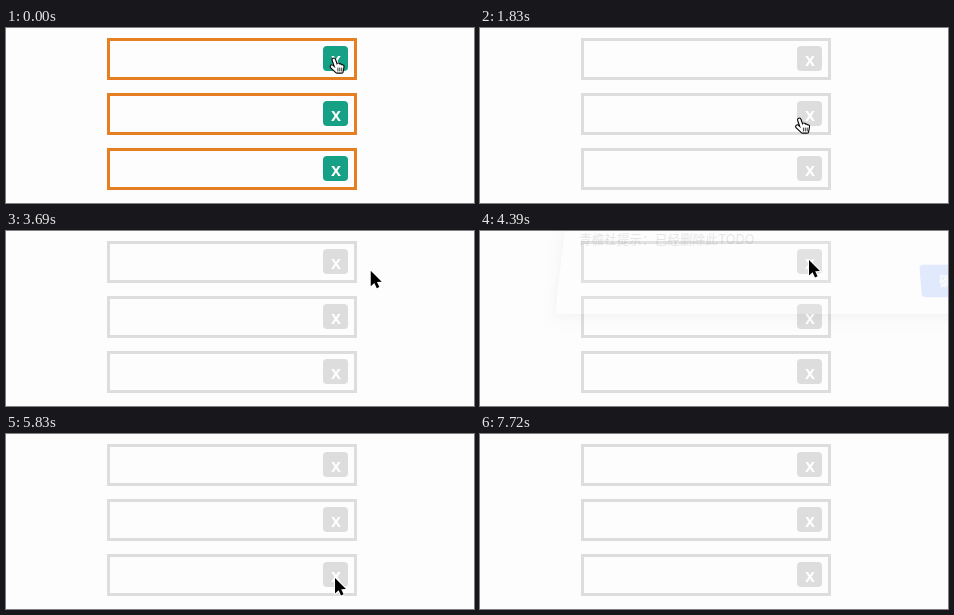
These frames come from a looping animation (468 px wide and 175 px high, 8250 ms). An HTML page with a canvas:

```html
<!DOCTYPE html>
<html lang="zh">
<head>
<meta charset="utf-8">
<title>TODO</title>
<style>
  html, body { margin: 0; width: 100%; height: 100%; overflow: hidden; background: #fdfdfd; }
  #stage { position: relative; width: 468px; height: 175px; overflow: hidden; }
  canvas { position: absolute; left: 0; top: 0; }
  #dialog {
    position: absolute; left: 75px; top: -20px; width: 448px; height: 119px;
    background: #fff; border-radius: 3px; transform-origin: 50% 100%;
    box-shadow: 0 0 1px rgba(0,0,0,.5), 0 2px 13px rgba(0,0,0,.3);
    font-family: Inter, "Noto Sans CJK SC", "Noto Sans CJK", sans-serif;
    white-space: nowrap;
  }
  #dialog div { position: absolute; left: 16px; }
  #title { top: 8px; font: 14.7px/20px Roboto, "Noto Sans CJK SC", "Noto Sans CJK", sans-serif; color: #222; }
  #message { top: 35px; font-size: 13px; line-height: 20px; letter-spacing: .15px; color: #555; }
  #dialog #ok {
    left: 368px; top: 71px; width: 64px; height: 32px; border-radius: 4px;
    color: #fff; font-size: 13px; line-height: 32px; text-align: center; font-weight: 600;
  }
</style>
</head>
<body>
<div id="stage">
  <canvas id="page" width="468" height="175"></canvas>
  <div id="dialog">
    <div id="title">127.0.0.1:5500 显示</div>
    <div id="message">青檐社提示：已经删除此TODO</div>
    <div id="ok">确定</div>
  </div>
  <canvas id="pointer" width="468" height="175"></canvas>
</div>
<script>
const LOOP = 8250, STEP = 57.5, FADE_STEPS = 5;
const PRESS_LEAD = 175, ARROW_LEAD = 230;
const WIDTH = 468, HEIGHT = 175;

const $ = id => document.getElementById(id);
const page = $('page').getContext('2d');
const pointer = $('pointer').getContext('2d');
const dialog = $('dialog'), ok = $('ok');

const clicks = [600, 1130, 1600];
const alerts = [
  { open: 2300, close: 3230 },
  { open: 4330, close: 5403 },
  { open: 6060, close: 7490 }
];

// Pointer stops: the cross of a row, the OK button, beyond the right edge
const cross = row => [329, 29 + 57.5 * row];
const onOk = y => [459.5, y];
const outside = y => [472, y];
const moves = [
  { at: clicks[0], steps: 4, to: cross(1) },
  { at: clicks[1], steps: 4, to: cross(2) },
  { at: clicks[2], steps: 4, to: [320.5, 89] },
  { at: 2530, steps: 8, to: outside(72) },
  { at: 3460, steps: 10, to: cross(0) },
  { at: 4445, steps: 3, to: outside(66) },
  { at: 4870, steps: 4, to: onOk(66) },
  { at: 5403, steps: 8, to: cross(2) },
  { at: 6060, steps: 4, to: outside(77) },
  { at: 6590, steps: 4, to: onOk(73) },
  { at: 7490, steps: 5, to: outside(125) }
];

const arrow = new Path2D('M0 0V15.5L3.6 12.2L6 17.4L8.6 16.3L6.2 11.2L11 11Z');
const hand = new Path2D('M4.3 2.8L7.5 12M2.4 9.6L7.5 14.3M8.7 14.4H12');
const creases = new Path2D();
for (let i = 0; i < 3; i++) {
  hand.moveTo(8.8 + 2 * i, 7.8 + 0.8 * i);
  hand.lineTo(9 + 1.6 * i, 13);
  creases.moveTo(8.4 + 1.9 * i, 11);
  creases.lineTo(8.4 + 1.9 * i, 14);
}

const easeOut = u => 1 - (1 - u) ** 2;

// Share done of a change that advances in even steps
function progress(t, at, steps) {
  const done = Math.floor((t - at) / STEP + 1.001);
  return Math.max(0, Math.min(1, done / steps));
}

function pointerAt(t) {
  let [x, y] = cross(0);
  for (const { at, steps, to } of moves) {
    const u = easeOut(progress(t, at, steps));
    x += (to[0] - x) * u;
    y += (to[1] - y) * u;
  }
  return [x, y];
}

function drawRows(t) {
  page.clearRect(0, 0, WIDTH, HEIGHT);
  page.font = 'bold 18px "Liberation Sans", sans-serif';
  page.textAlign = 'center';
  page.lineWidth = 3;
  clicks.forEach((click, row) => {
    const y = 10 + 55 * row, live = t < click;
    page.strokeStyle = live ? '#e67e22' : '#ddd';
    page.strokeRect(102.5, y + 1.5, 247, 39);
    page.fillStyle = live ? '#16a085' : '#ddd';
    page.beginPath();
    page.roundRect(317, y + 8, 25, 25, 4);
    page.fill();
    page.fillStyle = '#fff';
    page.fillText('x', 330, y + 28);
  });
}

function drawDialog(t, pointerX) {
  const fade = at => progress(t, at, FADE_STEPS);
  const now = alerts.find(a => fade(a.open) > 0 && fade(a.close) < 1);
  dialog.style.visibility = now ? 'visible' : 'hidden';
  if (!now) return;
  const shown = Math.min(fade(now.open), 1 - fade(now.close));
  const tilt = (1 - shown) / 0.6;
  const pressed = t >= now.close - PRESS_LEAD && pointerX < WIDTH;
  dialog.style.opacity = shown * shown;
  dialog.style.transform = tilt === 0 ? 'none' :
    `matrix3d(1,0,0,0, 0,${1 + 0.063 * tilt},0,${(-0.00054 * tilt).toFixed(6)}, 0,0,1,0, 0,${-16 * tilt},0,1)`;
  ok.style.background = pressed ? '#4a84e9' : '#4285f4';
}

function strokeWith(path, color, width) {
  pointer.strokeStyle = color;
  pointer.lineWidth = width;
  pointer.stroke(path);
}

function drawPointer(t, x, y) {
  const busy = alerts.some(a => t >= a.open - ARROW_LEAD && t < a.close);
  pointer.clearRect(0, 0, WIDTH, HEIGHT);
  pointer.save();
  pointer.lineJoin = pointer.lineCap = 'round';
  if (x < 340 && !busy) {
    pointer.translate(x - 5.5, y);
    strokeWith(hand, '#000', 4.6);
    strokeWith(hand, '#fff', 2.4);
    strokeWith(creases, '#000', 0.8);
  } else {
    pointer.translate(x, y);
    strokeWith(arrow, '#fff', 1.8);
    pointer.fill(arrow);
  }
  pointer.restore();
}

const begin = performance.now();
function frame() {
  const t = (performance.now() - begin) % LOOP;
  const [x, y] = pointerAt(t);
  drawRows(t);
  drawDialog(t, x);
  drawPointer(t, x, y);
  requestAnimationFrame(frame);
}
frame();
</script>
</body>
</html>
```
